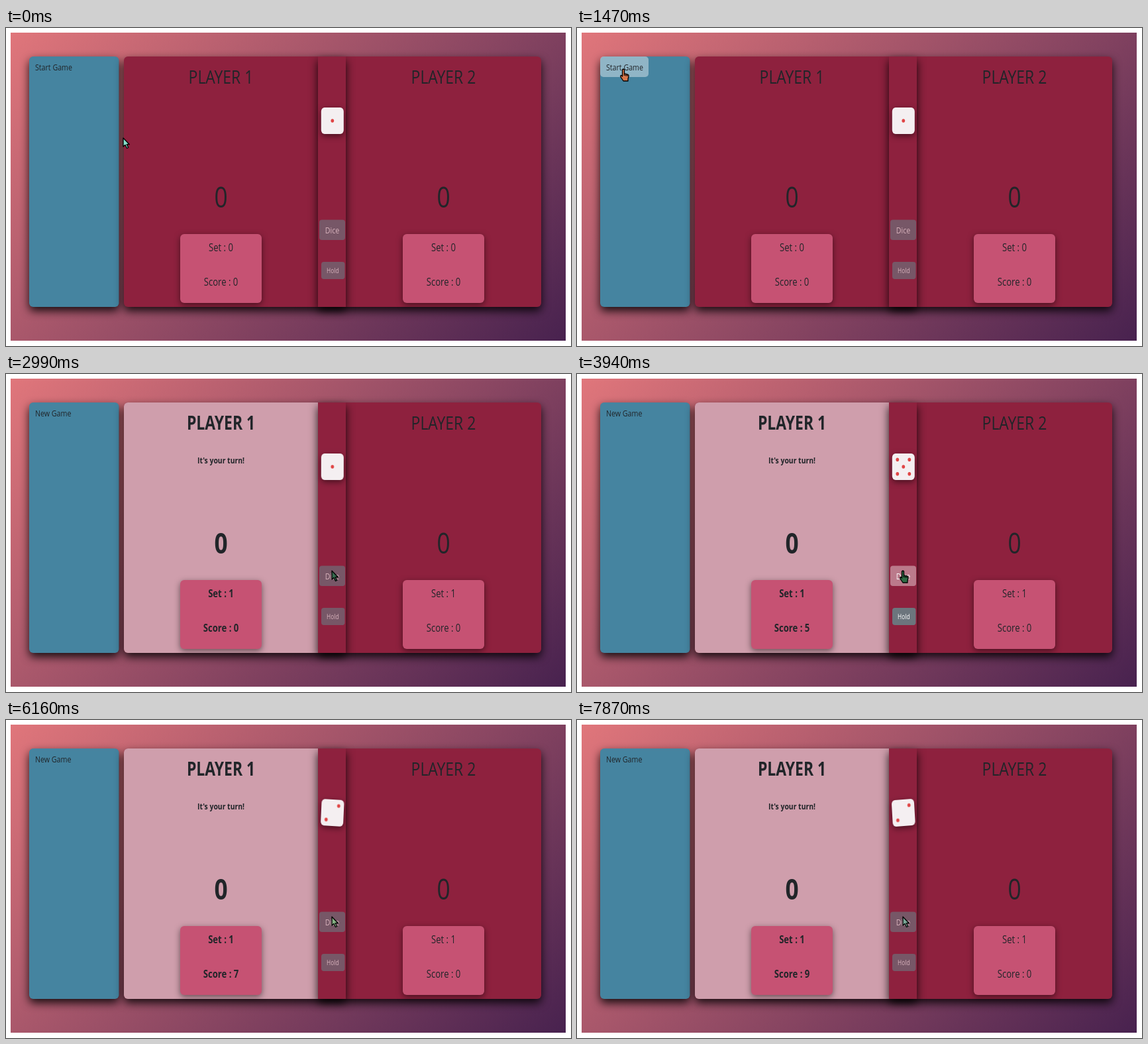
Recreate the animation shown at these times as an HTML page. Size 853 px wide and 480 px high, loop 8 s.

```html
<!DOCTYPE html>
<html lang="en">
<head>
<meta charset="utf-8">
<title>Dice game</title>
<style>
  html, body { margin: 0; width: 100%; height: 100%; overflow: hidden; background: #fff; }
  svg { display: block; width: 100vw; height: 100vh; }
  text { font-family: "Open Sans", "Noto Sans", sans-serif; fill: #212529; white-space: pre; }
  .mid { text-anchor: middle; }
  .btn text { fill: #fff; }
  .active text { font-weight: 700; }
  .deep { filter: drop-shadow(0 6px 7px rgba(0, 0, 0, .85)); }
  .soft { filter: drop-shadow(0 3px 5px rgba(0, 0, 0, .5)); }
  .wine { fill: #8e213e; }
  .card { fill: #c65273; }
</style>
</head>
<body>
<svg id="stage" viewBox="0 0 853 480">
  <defs>
    <linearGradient id="sky" gradientUnits="userSpaceOnUse" x1="100" y1="-86" x2="752" y2="565">
      <stop offset="0" stop-color="#e0767b"/>
      <stop offset="1" stop-color="#48224f"/>
    </linearGradient>
  </defs>
  <rect x="7" y="7" width="838" height="465" fill="url(#sky)"/>
  <rect class="deep" x="35" y="43" width="135.500" height="378" rx="6" fill="#4584a0"/>
  <rect id="startBg" x="35" y="43" width="73" height="31" rx="5" fill="#fff"/>
  <g id="menu"></g>
  <rect class="deep wine" x="178" y="43" width="630" height="378" rx="6"/>
  <rect id="lit" x="178" y="43" width="310" height="378" rx="6" fill="#cf9eac"/>
  <rect class="deep wine" x="471" y="43" width="42" height="378"/>
  <g id="p1"></g>
  <g id="p2"></g>
  <g id="die" class="soft"></g>
  <g id="dice" class="btn"><rect x="473" y="289.500" width="39" height="30.500" rx="4"/></g>
  <g id="hold" class="btn"><rect x="476" y="353" width="35.500" height="26" rx="4" fill="#6c757d"/></g>
  <g id="cursor" stroke="#000" stroke-width="1.300" stroke-linejoin="round">
    <path id="arrow" d="M0 0V13L3 10.500 5.500 15.500 7.700 14.500 5.300 9.700H9.300Z"/>
    <g id="hand">
      <path d="M-1.500 1Q0-1 1.500 1V6.500L6.500 8Q8.300 8.500 8 11L7 15V18H0L-4 12Q-5 9.500-3 9.500L-1.500 11Z"/>
      <path d="M1.500 6.500V10M3.700 7.500V10.500M5.900 8V10.800" fill="none"/>
    </g>
  </g>
</svg>
<script>
const $ = id => document.getElementById(id);
const LOOP = 8000, ASPECT = 0.82, DIE_ASPECT = 0.85;
const START = 1560, ROLL = 1000, FADE = 150;
const rolls = [[2450, 5], [4190, 2], [5600, 2], [7000, 0]];   // click time, result
const startHover = [1040, 1615];
const diceHover = rolls.map(([click], i) => [i ? rolls[i - 1][0] + ROLL : 2080, click]);
const path = [[300, 177, 166], [1250, 70, 62], [START, 70, 62], [1910, 454, 252], [2180, 492, 297]];
const tints = [[0, 134, 224, 204], [1470, 216, 118, 74], [1910, 63, 102, 88], [3940, 46, 107, 69],
  [5210, 176, 160, 122], [7050, 92, 192, 140], [7870, 122, 168, 152]];

function add(parent, tag, attrs) {
  const el = document.createElementNS("http://www.w3.org/2000/svg", tag);
  for (const k in attrs) el.setAttribute(k, attrs[k]);
  return parent.appendChild(el);
}

// The whole page is slightly narrowed, so all lettering shares one aspect.
function label(parent, x, y, size, str = "", cls = "mid") {
  const el = add(parent, "text", {
    transform: `translate(${x} ${y}) scale(${ASPECT} 1)`, "font-size": size, class: cls
  });
  el.textContent = str;
  return el;
}

function player(id, x, name) {
  const g = $(id);
  add(g, "rect", { class: "card soft", x: x - 61.5, y: 311, width: 123, height: 104, rx: 6 });
  label(g, x, 84, 28, name);
  label(g, x, 271, 43, "0");
  return {
    turn: label(g, x, 135, 12.7),
    set: label(g, x, 337, 16),
    score: label(g, x, 389, 16)
  };
}

const menu = label($("menu"), 44, 64, 13, "", "");
const one = player("p1", 324.5, "PLAYER 1");
const two = player("p2", 660.5, "PLAYER 2");
label($("dice"), 492.5, 310, 13, "Dice");
label($("hold"), 493.3, 370, 10.2, "Hold");

add($("die"), "rect", { x: -20, y: -20, width: 40, height: 40, rx: 6, fill: "#f4eff1" });
const spots = [[0, 0], [1, -1], [-1, 1], [-1, -1], [1, 1]];
const pips = spots.map(([x, y]) =>
  add($("die"), "circle", { cx: x * 10.6, cy: y * 10.8, r: 2.8, fill: "#e04545" }));
const faces = { 1: [0], 2: [1, 2], 5: [0, 1, 2, 3, 4] };

const clamp = v => Math.min(1, Math.max(0, v));
const smooth = p => p * p * (3 - 2 * p);
const mix = (a, b, p) => a + (b - a) * p;
const fade = (t, [from, to]) => clamp((t - from) / FADE) - clamp((t - to) / FADE);
const within = (t, [from, to]) => t >= from && t < to;
const show = (el, on) => el.setAttribute("visibility", on ? "visible" : "hidden");

function sample(keys, t, ease = p => p) {
  const next = keys.findIndex(k => k[0] > t);
  if (next === 0) return keys[0].slice(1);
  if (next < 0) return keys[keys.length - 1].slice(1);
  const a = keys[next - 1], b = keys[next];
  const p = ease((t - a[0]) / (b[0] - a[0]));
  return a.slice(1).map((v, i) => mix(v, b[i + 1], p));
}

function draw(t) {
  const on = t >= START;
  const done = rolls.filter(([click]) => t >= click + ROLL);
  const rolling = rolls.find(([click]) => within(t, [click, click + ROLL]));

  menu.textContent = on ? "New Game" : "Start Game";
  $("startBg").setAttribute("fill-opacity", 0.4 * fade(t, startHover));
  show($("lit"), on);
  $("p1").setAttribute("class", on ? "active" : "");
  one.turn.textContent = on ? "It's your turn!" : "";
  one.set.textContent = two.set.textContent = "Set : " + (on ? 1 : 0);
  one.score.textContent = "Score : " + done.reduce((sum, r) => sum + r[1], 0);
  two.score.textContent = "Score : 0";

  const face = faces[done.length ? done[done.length - 1][1] : 1];
  pips.forEach((pip, i) => show(pip, face.includes(i)));
  const tilt = rolling ? 4.5 * Math.sin((t - rolling[0]) / 180 * 2 * Math.PI) : 0;
  $("die").setAttribute("transform", `translate(492.8 140) scale(${DIE_ASPECT} 1) rotate(${tilt})`);

  const glow = diceHover.reduce((sum, span) => sum + fade(t, span), 0);
  const grey = [108, 117, 125].map(v => mix(v, 255, glow));
  $("dice").firstElementChild.setAttribute("fill", `rgba(${grey},${mix(1, 0.4, glow)})`);
  $("dice").setAttribute("opacity", on && !rolling ? 1 : 0.65);
  $("hold").setAttribute("opacity", done.length && !rolling ? 1 : 0.65);

  const pointing = [startHover, ...diceHover].some(span => within(t, span));
  show($("hand"), pointing);
  show($("arrow"), !pointing);
  $("cursor").setAttribute("transform", `translate(${sample(path, t, smooth)})`);
  $("cursor").setAttribute("fill", `rgb(${sample(tints, t)})`);
}

const begin = performance.now();
function tick() {
  draw((performance.now() - begin) % LOOP);
  requestAnimationFrame(tick);
}
tick();
</script>
</body>
</html>
```
